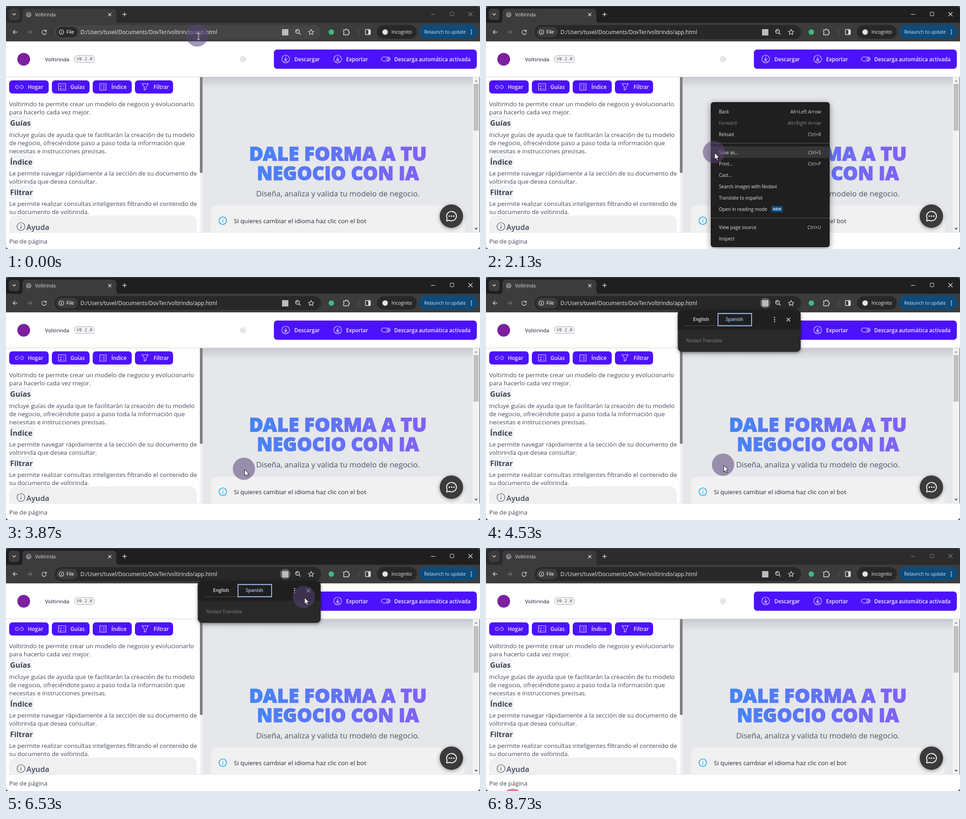
Animation, 1044 px wide and 536 px high, one loop 9070 ms. Source, as an HTML page with a canvas:

```html
<!DOCTYPE html>
<html lang="es">
<head>
<meta charset="utf-8">
<title>Voltirinda</title>
<style>
html, body { margin: 0; width: 100%; height: 100%; overflow: hidden; background: #3d5866; }
canvas { display: block; width: 1044px; height: 536px; }
</style>
</head>
<body>
<canvas id="stage" width="1044" height="536"></canvas>
<script>
const W = 1044, H = 536, LOOP = 9070;
const stage = document.getElementById('stage').getContext('2d');
const layer = document.createElement('canvas');
layer.width = W;
layer.height = H;
const layerCtx = layer.getContext('2d');
let g = stage;

const INDIGO = '#4c12ff', INK = '#414a58', LIGHT = '#e3e3e3', MENU = '#1f1f1f';
const clamp = v => Math.max(0, Math.min(1, v));

// Drawing helpers
function rect(x, y, w, h, fill) {
  g.fillStyle = fill;
  g.fillRect(x, y, w, h);
}
function box(x, y, w, h, r, fill, stroke, width = 1) {
  g.beginPath();
  g.roundRect(x, y, w, h, r);
  if (fill) { g.fillStyle = fill; g.fill(); }
  if (stroke) { g.strokeStyle = stroke; g.lineWidth = width; g.stroke(); }
}
function disc(x, y, r, fill, stroke, width = 1) {
  g.beginPath();
  g.arc(x, y, r, 0, Math.PI * 2);
  if (fill) { g.fillStyle = fill; g.fill(); }
  if (stroke) { g.strokeStyle = stroke; g.lineWidth = width; g.stroke(); }
}
function path(d, x, y, stroke, width = 1.3, fill) {
  const p = new Path2D(d);
  g.save();
  g.translate(x, y);
  g.lineJoin = 'round';
  if (fill) { g.fillStyle = fill; g.fill(p); }
  if (stroke) { g.strokeStyle = stroke; g.lineWidth = width; g.stroke(p); }
  g.restore();
}
function text(s, x, y, size, color, weight = 400, align = 'left', family = '"Open Sans", sans-serif') {
  g.font = `${weight} ${size}px ${family}`;
  g.textAlign = align;
  g.fillStyle = color;
  g.fillText(s, x, y);
}
function heavyText(s, x, y, size, color) {
  text(s, x, y, size, color, 800, 'center');
  g.strokeStyle = color;
  g.lineWidth = 1.3;
  g.strokeText(s, x, y);
}
function shadow(color, blur, dy, draw) {
  g.save();
  g.shadowColor = color;
  g.shadowBlur = blur;
  g.shadowOffsetY = dy;
  draw();
  g.restore();
}
function dots(x, y, dx, dy, r, color) {
  for (const k of [-1, 0, 1]) disc(x + k * dx, y + k * dy, r, color);
}
function info(x, y, r, color, width) {
  disc(x, y, r, null, color, width);
  rect(x - .7, y - r * .1, 1.4, r * .6, color);
  rect(x - .7, y - r * .5, 1.4, 1.5, color);
}

const DOWNLOAD = 'M0-5V3M-3.5 0L0 3.5L3.5 0M-4.5 5.5H4.5';

function drawTabs(active) {
  rect(0, 1, W, 37, active ? '#1f1f1f' : '#2b2b2b');
  box(6, 6, 24, 25, 7, '#3c3c3c');
  path('M-3.5-2L0 1.5L3.5-2', 18, 18.5, LIGHT, 1.5);
  path('M28 38Q36 38 36 30V15Q36 6 45 6H234Q243 6 243 15V30Q243 38 251 38Z', 0, 0, null, 0, '#3c3c3c');
  disc(50, 19, 6, '#85898d');
  path('M-4-2L-1-3L1 0L-1 3M2-4L4 0', 50, 19, '#55595d', 1.5);
  text('Voltirinda', 64, 22.7, 10.1, LIGHT);
  path('M-3.3-3.3L3.3 3.3M3.3-3.3L-3.3 3.3', 228.5, 19, LIGHT);
  path('M-4.5 0H4.5M0-4.5V4.5', 261, 18.5, LIGHT);
  const ctl = active ? '#f1f1f1' : '#858585';
  path('M-5 0H4', 941, 18.5, ctl, 1);
  box(978.5, 13.5, 8, 8, 1, null, ctl);
  path('M-4.5-4.5L4.5 4.5M4.5-4.5L-4.5 4.5', 1023, 18, ctl, 1.1);
}

function drawToolbar(hover, translating) {
  rect(0, 37, W, 41, '#3c3c3c');
  path('M5 0H-4.5M0-4.5L-4.5 0L0 4.5', 20, 57.5, '#d0d0d0', 1.4);
  path('M-5 0H4.5M0-4.5L4.5 0L0 4.5', 52, 57.5, '#777', 1.4);
  path('M4.2-2A4.8 4.8 0 1 0 4.8 1M4.8-5V-1.5H1.2', 84, 57.5, '#d0d0d0', 1.4);
  box(107, 42, 587, 31, 15.5, hover ? '#454545' : '#282828');
  box(111, 46, 47, 23, 11.5, hover ? '#292929' : '#3c3c3c');
  info(122, 57.5, 5, LIGHT, 1.2);
  text('File', 133, 61.3, 10.2, LIGHT, 600);
  text('D:/Users/tuvel/Documents/DovTer/voltirindo/app.html', 164, 61.7, 11.85, '#ececec');
  if (translating) disc(615, 57.5, 11.5, '#5b5b5b');
  rect(608, 51, 14, 14, '#b9bbbd');
  disc(642, 56, 4.2, null, LIGHT, 1.4);
  path('M3 3L7 7M-3-1H1', 642, 56, LIGHT, 1.4);
  path('M0-6L1.8-2L6-1.6L2.8 1.2L3.8 5.4L0 3.2L-3.8 5.4L-2.8 1.2L-6-1.6L-1.8-2Z', 672, 57.5, LIGHT, 1.2);
  disc(716.5, 57.5, 6, '#41b883');
  path('M-6-4H-2A2 2 0 0 1 2-4H5V-.5A2 2 0 0 1 5 3.5V6.5H-6V3A2 2 0 0 0-6-.5Z', 749.5, 57, LIGHT, 1.4);
  rect(776, 50, 1, 16, '#55616a');
  box(791.5, 52, 11, 11, 1.5, null, LIGHT, 1.4);
  rect(798, 52, 5, 11, LIGHT);
  box(817, 42, 88, 30, 15, '#282828');
  disc(835, 57.5, 6, LIGHT);
  text('Incognito', 849, 61.2, 10.35, '#f1f1f1');
  box(909, 41, 130, 31, 15.5, '#0f4a78');
  text('Relaunch to update', 921, 61, 10.1, '#cce8ff');
  dots(1025, 57.5, 0, 4.2, 1.2, '#cce8ff');
}

function drawHeader() {
  rect(0, 78, W, 79, '#fff');
  rect(0, 156, W, 1, '#cfd1d4');
  disc(39, 117.5, 14, '#7d1fa0');
  text('Voltirinda', 86, 122.3, 11.4, INK, 600);
  box(151.5, 109.5, 43, 15, 5, '#f3f4f6', '#a4a8ad');
  text('V0.2.0', 155.5, 120.3, 9.7, '#555b63', 400, 'left', '"Noto Sans Mono", monospace');
  disc(522, 117.5, 7, '#e5e7eb');
  box(590, 96, 447, 42.5, 7, INDIGO);
  for (const x of [616, 730.5]) {
    disc(x, 117, 8.5, null, '#e6e0ff', 1.1);
    path(DOWNLOAD, x, 116.5, '#e6e0ff', 1.1);
  }
  box(827, 112.5, 19, 9, 4.5, null, '#e6e0ff', 1.2);
  disc(841.5, 117, 2.5, null, '#e6e0ff', 1.2);
  text('Descargar', 635, 122.2, 11.6, '#eeeaff', 600);
  text('Exportar', 749, 122.2, 11.6, '#eeeaff', 600);
  text('Descarga automática activada', 855, 122.2, 11.6, '#eeeaff', 600);
}

const BUTTONS = [
  ['Hogar', 7, 87, 48, 'M-2-3.5H-5A3.5 3.5 0 0 0-5 3.5H-2M2-3.5H5A3.5 3.5 0 0 1 5 3.5H2M-4 0H4'],
  ['Guías', 101, 83, 142, 'M-8-7H8V7H-8ZM-5-2L-3.5-.5L-1-3M-5 3L-3.5 4.5L-1 2M2-2H5.5M2 3H5.5'],
  ['Índice', 191, 86, 232, 'M-7-7H7V7H-7ZM-4-3.5H-2.5M-.5-3.5H4.5M-4 0H-2.5M-.5 0H4.5M-4 3.5H-2.5M-.5 3.5H4.5'],
  ['Filtrar', 284, 84, 325, 'M-7-7H7L2 0V5L-2 7V0Z']
];
const HELP = [
  ['Voltirindo te permite crear un modelo de negocio y evolucionarlo', 220.5],
  ['para hacerlo cada vez mejor.', 238.5],
  ['Incluye guías de ayuda que te facilitarán la creación de tu modelo', 288.5],
  ['de negocio, ofreciéndote paso a paso toda la información que', 306.5],
  ['necesitas e instrucciones precisas.', 324.5],
  ['Le permite navegar rápidamente a la sección de su documento de', 373.5],
  ['voltirinda que desea consultar.', 391.5],
  ['Le permite realizar consultas inteligentes filtrando el contenido de', 440.5],
  ['su documento de voltirinda.', 458.5]
];
const HEADINGS = [['Guías', 242, 50], ['Índice', 328, 55], ['Filtrar', 395, 54]];

function drawLeftPanel() {
  rect(0, 157, 433, 343, '#fff');
  for (const [label, x, w, tx, icon] of BUTTONS) {
    box(x, 164, w, 29, 7, INDIGO);
    path(icon, tx - 18.5, 178.5, '#e6e0ff', 1.1);
    text(label, tx, 183, 11.6, '#eeeaff', 600);
  }
  for (const [label, y, w] of HEADINGS) {
    box(7, y, w, 31, 4, '#f3f4f5');
    text(label, 9, y + 22, 16.3, '#3a4350', 700);
  }
  for (const [line, y] of HELP) text(line, 7, y, 13.46, INK);
  box(7, 462, 413, 60, 15, '#f0f0f0');
  info(33, 486.5, 8.7, INK, 1.1);
  text('Ayuda', 45, 493.7, 16.6, INK, 600);
  rect(427, 157, 6, 343, '#f1f1f1');
  rect(427, 157, 6, 211, '#808080');
}

function drawRightPanel() {
  rect(433, 157, 595, 343, '#e5e7eb');
  const shade = g.createLinearGradient(0, 157, 0, 182);
  shade.addColorStop(0, 'rgba(90,95,105,.22)');
  shade.addColorStop(1, 'rgba(90,95,105,0)');
  rect(433, 157, 595, 25, shade);
  const hero = g.createLinearGradient(535, 0, 930, 0);
  hero.addColorStop(0, '#4484f7');
  hero.addColorStop(1, '#8360f5');
  heavyText('DALE FORMA A TU', 731, 340.5, 42.9, hero);
  heavyText('NEGOCIO CON IA', 731, 383.5, 41.7, hero);
  text('Diseña, analiza y valida tu modelo de negocio.', 551, 419.7, 16.85, '#4b5563');
  box(451, 440, 559, 80, 15, '#f1f1f1');
  info(477.5, 473.5, 8.3, '#0ea5e9', 1.6);
  text('Si quieres cambiar el idioma haz clic con el bot', 502, 478.7, 13.5, '#1f2937');
  rect(1028, 157, 15, 343, '#f1f1f1');
  rect(1030, 172, 11, 103, '#c1c1c1');
  path('M-3.5 2L0-2L3.5 2Z', 1035.5, 165, null, 0, '#a3a3a3');
  path('M-3.5-2L0 2L3.5-2Z', 1035.5, 491.5, null, 0, '#505050');
  shadow('rgba(0,0,0,.4)', 8, 2, () => disc(981, 463.5, 25.7, '#3b3b3b'));
  path('M-10.5 10.5L-9.5 4.5A10.8 10.3 0 1 1-4.5 9.3Z', 981, 463.5, '#fff', 1.9);
  dots(981.5, 463.5, 5, 0, 1.6, '#fff');
}

function drawPage() {
  g.save();
  g.beginPath();
  g.rect(0, 157, W, 343);
  g.clip();
  drawLeftPanel();
  drawRightPanel();
  g.restore();
  rect(0, 499, W, 37, '#fff');
  rect(0, 499, W, 1, '#e5e7eb');
  text('Pie de página', 7, 523.5, 13.5, INK);
}

const ITEMS = [
  ['Back', 233, 'Alt+Left Arrow'], ['Forward', 258, 'Alt+Right Arrow'], ['Reload', 283, 'Ctrl+R'],
  ['Save as...', 323, 'Ctrl+S'], ['Print...', 348, 'Ctrl+P'], ['Cast...', 373],
  ['Search images with Nodavi', 398], ['Translate to español', 423], ['Open in reading mode', 448],
  ['View page source', 488, 'Ctrl+U'], ['Inspect', 513]
];

function drawMenu(pointerY) {
  shadow('rgba(0,0,0,.45)', 14, 3, () => box(495, 212, 262, 320, 6, MENU));
  for (const [label, y, keys] of ITEMS) {
    const disabled = label === 'Forward';
    if (!disabled && Math.abs(pointerY - y) <= 12.5) rect(495, y - 13, 262, 25, '#363636');
    const color = disabled ? '#858585' : LIGHT;
    text(label, 513, y + 3.8, 10.2, color);
    if (keys) text(keys, 738, y + 3.8, 10.2, disabled ? color : '#d0d0d0', 400, 'right');
  }
  rect(495, 302, 262, 1, '#5a5a5a');
  rect(495, 467, 262, 1, '#5a5a5a');
  box(628, 441, 26, 14, 3, '#0f4a78');
  text('NEW', 641, 451.2, 8, '#cce8ff', 700, 'center');
}

function drawPopup() {
  shadow('rgba(0,0,0,.5)', 7, 2, () => box(422.5, 73, 270.5, 92, 9, '#292929'));
  box(422.5, 73, 270.5, 43, [9, 9, 0, 0], MENU);
  rect(437, 107, 75, 1, '#4a4a4a');
  text('English', 456, 97.3, 10.3, LIGHT, 600);
  box(511, 80.5, 74, 27, 0, null, '#a8c7fa', 1.8);
  text('Spanish', 528, 97.3, 10.2, '#a8c7fa', 600);
  dots(635.5, 94, 0, 4.4, 1.3, LIGHT);
  path('M-4-4L4 4M4-4L-4 4', 666, 94, LIGHT, 1.4);
  text('Nodavi Translate', 441, 143.7, 10.2, '#858585');
}

// Composites a group as one sheet, so its parts fade together.
function fade(alpha, scale, cx, cy, draw) {
  if (alpha <= 0) return;
  layerCtx.clearRect(0, 0, W, H);
  g = layerCtx;
  draw();
  g = stage;
  g.save();
  g.globalAlpha = alpha;
  g.translate(cx, cy);
  g.scale(scale, scale);
  g.drawImage(layer, -cx, -cy);
  g.restore();
}

// Pointer stops: time, x, y
const STOPS = [
  [0, 421, 65], [30, 421, 65], [580, 495, 212], [1770, 495, 212], [2130, 502, 322],
  [2640, 520, 495], [2780, 522, 512], [3080, 520, 397], [3270, 524, 423], [4370, 524, 423],
  [4530, 522, 414], [4710, 522, 414], [5600, 520, 387], [5670, 520, 380], [6480, 656, 108],
  [6560, 656, 108], [6740, 652, 189], [6980, 679, 125], [7200, 664, 99], [7480, 664, 99],
  [8270, 189, 465], [8720, 59, 555.5], [LOOP, 59, 555.5]
];
const slope = (i, k) => (STOPS[i + 1][k] - STOPS[i][k]) / (STOPS[i + 1][0] - STOPS[i][0]);
function tangent(i, k) {
  if (i === 0 || i === STOPS.length - 1) return 0;
  const a = slope(i - 1, k), b = slope(i, k);
  return a * b <= 0 ? 0 : 2 * a * b / (a + b);
}
function pointerAt(t) {
  let i = 0;
  while (i < STOPS.length - 2 && STOPS[i + 1][0] <= t) i++;
  const span = STOPS[i + 1][0] - STOPS[i][0], u = (t - STOPS[i][0]) / span;
  return [1, 2].map(k => {
    const p = STOPS[i][k], q = STOPS[i + 1][k];
    const s = u * u * (3 - 2 * u);
    return p + (q - p) * s + span * (tangent(i, k) * u * (1 - u) ** 2 - tangent(i + 1, k) * u * u * (1 - u));
  });
}

function drawPointer(x, y, inField, pressed) {
  disc(x, y, 24.5, pressed ? 'rgba(205,45,50,.6)' : 'rgba(88,68,118,.54)');
  if (inField) path('M-3-7H-1Q0-7 0-6Q0-7 1-7H3M0-6V6M-3 7H-1Q0 7 0 6Q0 7 1 7H3', x + 3, y + 2, '#e8e8e8', 1.1);
  else path('M0 0V14.5L3.3 11.4L5.6 16.6L8 15.5L5.7 10.5H10.3Z', x + 1.5, y + 1.5, '#111', 1, '#fff');
}

function render(t) {
  const [x, y] = pointerAt(t);
  const inField = y > 42 && y < 73 && x < 694;
  const menu = Math.min(clamp((t - 1080) / 180), clamp((3830 - t) / 130));
  const popup = Math.min(clamp((t - 4010) / 190), clamp((7580 - t) / 200));

  rect(0, 0, W, H, '#3d5866');
  g.save();
  g.beginPath();
  g.roundRect(0, 1, W, 535, 7);
  g.clip();
  drawTabs(t >= 800 && t < 8690);
  drawToolbar(inField, popup > 0);
  drawHeader();
  drawPage();
  g.restore();

  fade(menu, 1, 0, 0, () => drawMenu(y + 2));
  fade(popup, 1 - .066 * (1 - popup), 558, 119, drawPopup);
  drawPointer(x, y, inField, t >= 8690);
}

function tick() {
  render(performance.now() % LOOP);
  requestAnimationFrame(tick);
}
tick();
</script>
</body>
</html>
```
